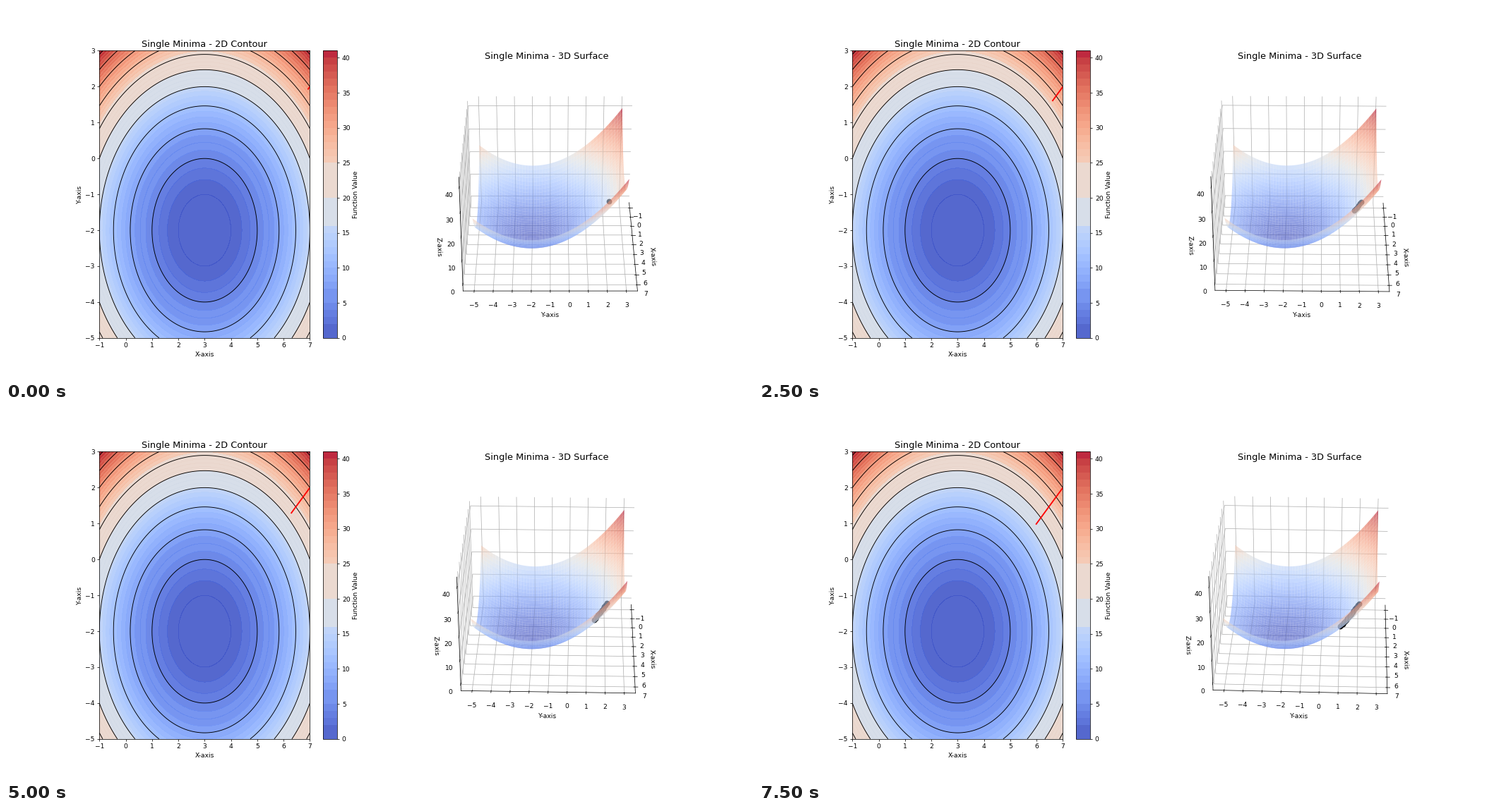
These frames come from a looping animation (1058 by 529 pixels, 8 s). A matplotlib script:

```python
import numpy as np
import matplotlib as mpl
import matplotlib.pyplot as plt
from matplotlib.animation import FuncAnimation
from matplotlib.colors import ListedColormap

FRAMES, INTERVAL = 16, 500
TURN = 0.144          # degrees of azimuth per frame
START = (7.0, 2.0)


def bowl(x, y):
    return (x - 3) ** 2 + (y + 2) ** 2


def descent(steps):
    """Position after a number of nearly constant, slowly shrinking steps."""
    d = 0.0657 * steps - 0.00015 * steps ** 2
    return START[0] - d, START[1] - d


def padded(lo, hi):
    lo, hi = lo - 0.05 * (hi - lo), hi + 0.05 * (hi - lo)
    pad = (hi - lo) / 48
    return lo - pad, hi + pad


def band_map():
    """One colour per unit of height, with a few neighbours merged."""
    v = np.arange(41) + 0.5
    v[0:2] = 1
    v[5:7] = 6
    v[16:20] = 19
    v[20:25] = 22.5
    return ListedColormap(mpl.colormaps["coolwarm"](v / 41))


X, Y = np.meshgrid(np.linspace(-1, 7, 100), np.linspace(-5, 3, 100))
Z = bowl(X, Y)

fig = plt.figure(figsize=(16, 8), dpi=66.125)

# Contour panel
flat = fig.add_subplot(1, 2, 1)
fill = flat.contourf(X, Y, Z, levels=np.arange(42), cmap=band_map(),
                     vmin=0, vmax=41, alpha=0.9)
flat.contour(X, Y, Z, levels=np.arange(4, 41, 4), colors="black", linewidths=1)
fig.colorbar(fill, ax=flat, label="Function Value", ticks=range(0, 41, 5))
flat.set_title("Single Minima - 2D Contour", fontsize=14)
flat.set_xlabel("X-axis")
flat.set_ylabel("Y-axis")
trail, = flat.plot([], [], color="red", lw=2)
flat.set_xlim(-1, 7)
flat.set_ylim(-5, 3)

# Surface panel
solid = fig.add_subplot(1, 2, 2, projection="3d")
solid.plot_surface(X, Y, Z, cmap="coolwarm", alpha=0.6)
dots, = solid.plot([START[0]], [START[1]], [bowl(*START)], "o",
                   color="black", ms=7, mew=1.5)
solid.set_title("Single Minima - 3D Surface", fontsize=14)
solid.set_xlabel("X-axis")
solid.set_ylabel("Y-axis")
solid.set_zlabel("Z-axis")
solid.set_xlim(*padded(-1, 7))
solid.set_ylim(*padded(-5, 3))
solid.set_zlim(*padded(0, 41))
for axis in (solid.xaxis, solid.yaxis, solid.zaxis):
    axis.set_pane_color((1, 1, 1, 0))


def update(n):
    trail.set_data(*descent(np.arange(n + 2)))
    x, y = descent(np.arange(n + 1))
    dots.set_data_3d(x, y, bowl(x, y))
    solid.view_init(elev=30, azim=0.001 + TURN * n)
    return trail, dots


anim = FuncAnimation(fig, update, frames=FRAMES, interval=INTERVAL,
                     init_func=lambda: update(0), repeat=True)
plt.show()
```
